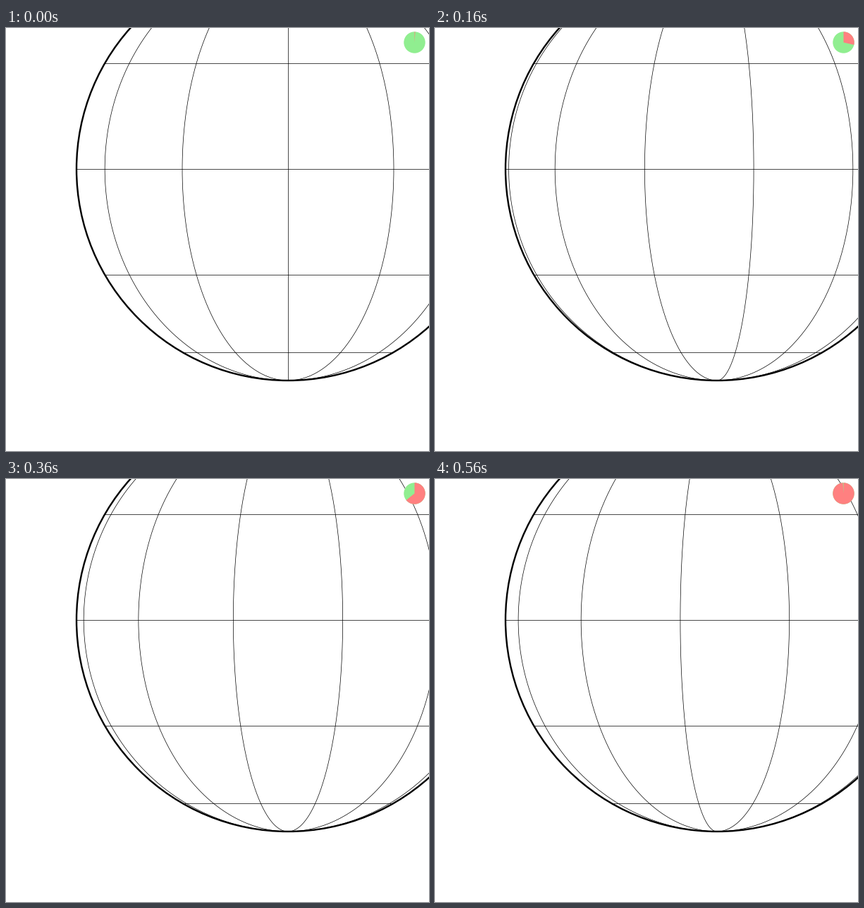
Recreate the animation shown at these times as a matplotlib script. Size 600 by 600 pixels, loop 600 ms.

```python
import numpy as np
import matplotlib.pyplot as plt
from matplotlib.animation import FuncAnimation
from matplotlib.patches import Circle, Wedge

SIZE, DPI = 600, 100
PX = 72 / DPI  # points per pixel
FRAMES, INTERVAL = 15, 40
CX, CY, R = 400, 200, 300
STEP = 30  # degrees between grid lines
SPIN = -5  # degrees per frame

fig = plt.figure(figsize=(SIZE / DPI, SIZE / DPI), dpi=DPI, facecolor="white")
ax = fig.add_axes([0, 0, 1, 1])
ax.set_xlim(0, SIZE)
ax.set_ylim(SIZE, 0)
ax.axis("off")

thin = dict(color="black", lw=0.7 * PX, solid_capstyle="butt")
lat = np.radians(np.linspace(-90, 90, 361))

# parallels
for deg in range(-60, 61, STEP):
    a = np.radians(deg)
    y, half = CY + R * np.sin(a), R * np.cos(a)
    ax.plot([CX - half, CX + half], [y, y], **thin)

meridians = [ax.plot([], [], **thin)[0] for _ in range(180 // STEP)]
ax.add_patch(Circle((CX, CY), R, fill=False, ec="black", lw=2.4 * PX))

# progress pie
PIE = (579.5, 20.5)
PIE_R = 15.2
ax.add_patch(Circle(PIE, PIE_R, fc="#90ee90", ec="none", zorder=5))
slice_ = Wedge(PIE, PIE_R, -90, -86, fc="#ff8080", ec="none", zorder=6)
ax.add_patch(slice_)


def draw(n):
    first = (SPIN * n) % STEP - 90
    for i, line in enumerate(meridians):
        lon = first + i * STEP
        width = R * np.sin(np.radians(lon))
        if lon == 0:
            line.set_data([CX, CX], [CY - R, CY + R])
        else:
            line.set_data(CX + width * np.cos(lat), CY + R * np.sin(lat))
    done = np.clip(n / (FRAMES - 1), 0.01, 0.99)
    slice_.set_theta2(-90 + 360 * done)
    return [*meridians, slice_]


anim = FuncAnimation(fig, draw, frames=FRAMES, interval=INTERVAL,
                     repeat=True, repeat_delay=0, blit=False)
plt.show()
```
